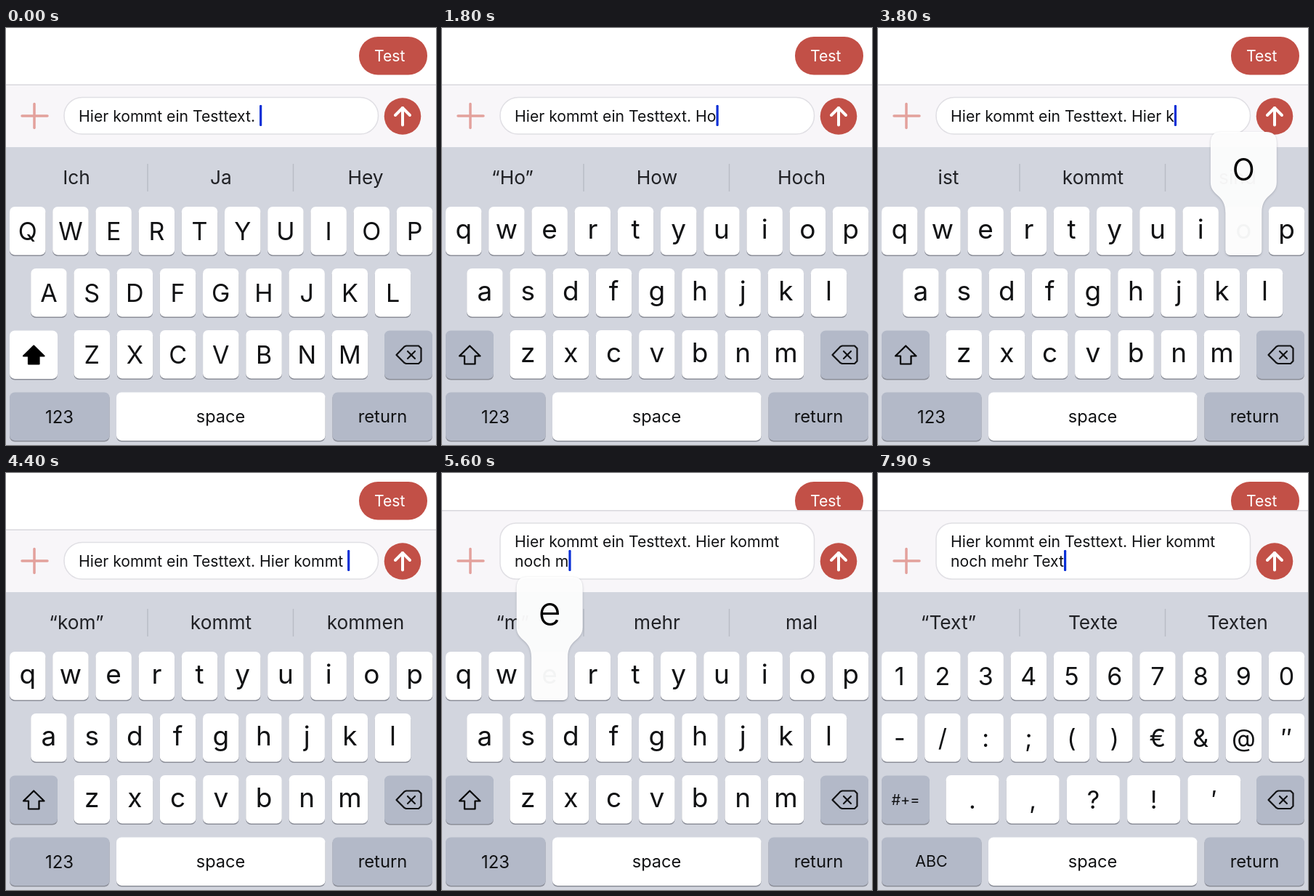
An HTML page with a canvas for the animation above (8000 ms loop, 592 by 574 pixels).

```html
<!DOCTYPE html>
<html lang="de">
<head>
<meta charset="utf-8">
<style>
html, body { margin: 0; width: 100%; height: 100%; overflow: hidden; background: #fff; }
canvas { display: block; }
</style>
</head>
<body>
<canvas id="stage" width="592" height="574"></canvas>
<script>
const c = document.getElementById('stage').getContext('2d');
const LOOP = 8000, HOLD = 110, LAG = 160;
const RED = '#c25047', GREY = '#b3b9c8', INK = '#111214';
const FIRST = 'Hier kommt ein Testtext. ', WRAP = 36;
const WRAP_TIME = 4810, PITCH = 59.2;

// [touch time, key]
const taps = [
  [1000, 'H'], [1400, 'o'], [2100, '<'], [2500, 'i'], [2950, 'e'], [3150, 'r'],
  [3400, ' '], [3600, 'k'], [3800, 'o'], [4000, 'm'], [4280, 'mt '], [4550, 'n'],
  [4700, 'o'], [4850, 'c'], [5000, 'h'], [5150, ' '], [5300, 'm'], [5560, 'e'],
  [5800, 'h'], [6000, 'r'], [6150, ' '], [6640, 'T'], [6900, 'e'], [7150, 'x'], [7400, 't']
];

const next = { '': 'Ich Ja Hey', 'Hier': 'ist kommt sind', 'kommt': 'der noch ein',
  'noch': 'ein mal nicht', 'mehr': 'als Geld Zeit' };
const complete = { H: 'Hallo Hast', Ho: 'How Hoch', Hi: 'Hier 👋', Hie: 'Hier Hielt',
  Hier: 'Hiermit Hierher', k: 'kann kein', ko: 'kommt kommen', kom: 'kommt kommen',
  n: 'noch nicht', no: 'noch nochmal', noc: 'noch nochmal', noch: 'nochmal nochmals',
  m: 'mehr mal', me: 'mehr mein', meh: 'mehr mehrere', mehr: 'mehrere mehrmals',
  T: 'Tag Tage', Te: 'Teil Test', Tex: 'Text Texte', Text: 'Texte Texten' };

const letters = ['QWERTYUIOP', 'ASDFGHJKL', 'ZXCVBNM'];
const symbols = ['1234567890', '-/:;()€&@″', '.,?!′'];

function typed(t) {
  let s = '';
  for (const [at, key] of taps) {
    if (at + HOLD > t) break;
    s = key === '<' ? s.slice(0, -1) : s + key;
  }
  return s;
}

function suggestions(t, caps) {
  const s = typed(t - LAG), words = s.split(' '), word = words.pop();
  if (word) return ['“' + word + '”', ...complete[word].split(' ')];
  const list = next[words.pop() || ''].split(' ');
  return caps ? list.map(w => w[0].toUpperCase() + w.slice(1)) : list;
}

function label(s, x, y, size, color = INK, align = 'center', weight = 400) {
  c.font = `${weight} ${size}px Inter, "Open Sans", sans-serif`;
  c.textAlign = align;
  c.fillStyle = color;
  c.fillText(s, x, y);
}

function box(x, y, w, h, r, fill) {
  c.beginPath();
  c.roundRect(x, y, w, h, r);
  c.fillStyle = fill;
  c.fill();
}

function key(x, y, w, fill = '#fff') {
  box(x, y + 1.6, w, 66.4, 7, '#8b8e98');
  box(x, y, w, 66.4, 7, fill);
}

function line(points, color, width, close) {
  c.beginPath();
  points.forEach(p => c.lineTo(...p));
  if (close) c.closePath();
  c.strokeStyle = color;
  c.lineWidth = width;
  c.stroke();
}

function hand() {
  const arm = (points, w) => {
    line(points, '#d9992b', w + 1.2);
    line(points, '#ffcb45', w);
  };
  arm([[501, 213], [510, 198]], 5.5);
  [[482, 205], [482, 198], [487, 193], [494, 193]].forEach((p, i) =>
    arm([p, [496 + i * 2.5, 216 - i * 2.5]], 5.5));
  c.beginPath();
  c.ellipse(502, 212, 11, 10, .7, 0, 7);
  c.fillStyle = '#ffcb45';
  c.fill();
  c.strokeStyle = '#777a82';
  c.lineWidth = 1.5;
  for (const [x, y, a] of [[498, 196, -1.25], [489, 211, 2.1]])
    for (const r of [9, 12.5]) {
      c.beginPath();
      c.arc(x, y, r, a, a + .9);
      c.stroke();
    }
}

function popup(x, y, ch, caps) {
  c.save();
  c.globalAlpha = .95;
  c.shadowColor = 'rgba(60,65,80,.3)';
  c.shadowBlur = 3;
  c.shadowOffsetY = 1;
  c.translate(x, y);
  c.beginPath();
  c.moveTo(-31, -103);
  c.lineTo(31, -103);
  c.quadraticCurveTo(45.5, -103, 45.5, -88);
  c.lineTo(45.5, -34);
  c.bezierCurveTo(45.5, -14, 25, -18, 25, 8);
  c.lineTo(25, 60);
  c.quadraticCurveTo(25, 67, 18, 67);
  c.lineTo(-18, 67);
  c.quadraticCurveTo(-25, 67, -25, 60);
  c.lineTo(-25, 8);
  c.bezierCurveTo(-25, -18, -45.5, -14, -45.5, -34);
  c.lineTo(-45.5, -88);
  c.quadraticCurveTo(-45.5, -103, -31, -103);
  c.fillStyle = '#fff';
  c.fill();
  c.restore();
  label(ch, x, y - 37, caps ? 58 : 54, '#000', 'center', 300);
}

function inputBar(t) {
  const p = Math.min(1, Math.max(0, (t - WRAP_TIME) / 150));
  const rise = 26.5 * p * (2 - p);
  const all = FIRST + typed(t);
  const wrapped = t >= WRAP_TIME;

  box(486, 12, 94, 52.5, 26, RED);
  label('Test', 507, 45.5, 21.2, '#fff', 'left');
  box(0, 78 - rise, 592, 87 + rise, 0, '#f8f6f9');
  box(0, 77.5 - rise, 592, 1.5, 0, '#d9d8dd');
  box(80, 95.5 - rise, 432.5, 50.5 + rise, 25 - rise * .12, '#fff');
  c.strokeStyle = '#e0dfe4';
  c.lineWidth = 1.5;
  c.stroke();

  line([[22, 121], [57, 121]], '#e3a19c', 3.5);
  line([[39, 104.5], [39, 137.5]], '#e3a19c', 3.5);
  c.beginPath();
  c.arc(546, 121.5, 25.3, 0, 7);
  c.fillStyle = RED;
  c.fill();
  line([[546, 133.5], [546, 110]], '#fff', 4);
  line([[536, 120], [546, 110], [556, 120]], '#fff', 4);

  const rows = wrapped ? [all.slice(0, WRAP), all.slice(WRAP)] : [all];
  label(rows[0], 100, 128.5 - rise, 21.2, INK, 'left');
  if (wrapped) label(rows[1], 100, 128.5, 21.2, INK, 'left');
  if (t < 400 || t > 800) {
    const x = 100 + c.measureText(rows[rows.length - 1]).width;
    box(x, 106, 3.2, 29, 1.2, '#0a2fd6');
  }
}

function draw(t) {
  const numeric = t >= 7700;
  const caps = t < 1000 + HOLD || (t >= 6400 && t < 6640 + HOLD);
  const active = taps.find(([at]) => t >= at && t < at + HOLD);
  const pressed = active ? active[1] : '';
  c.lineCap = c.lineJoin = 'round';
  box(0, 0, 592, 574, 0, '#fff');
  inputBar(t);
  box(0, 164, 592, 410, 0, '#d2d5de');

  for (const x of [195, 395.5]) box(x - .75, 187, 1.5, 38, 0, '#b9bcc6');
  suggestions(t, caps).forEach((s, i) => {
    if (s === '👋') hand();
    else label(s, 97 + i * 199, 215, 26.3, '#202125');
  });

  let bubble;
  (numeric ? symbols : letters).forEach((row, r) => {
    const y = 246 + r * 85;
    const wide = numeric && r === 2;
    const x0 = r === 0 || (numeric && r === 1) ? 5 : r === 1 ? 34.2 : 93.5;
    const w = wide ? 73 : 49.5, step = wide ? 83.2 : PITCH;
    [...row].forEach((name, i) => {
      const ch = numeric || caps ? name : name.toLowerCase();
      const x = x0 + i * step, mid = x + w / 2;
      key(x, y, w);
      if (numeric) label(ch, mid, y + 46, 34);
      else label(ch, mid, y + (caps ? 46 : 44), caps ? 34 : 37);
      if (ch === pressed) bubble = [mid, y, ch, caps];
    });
  });

  key(5, 416.5, 66, caps ? '#fff' : GREY);
  if (numeric) label('#+=', 38, 457, 20);
  else {
    line([[38.2, 437.5], [52.5, 451.5], [45.5, 451.5], [45.5, 462.5], [31, 462.5],
      [31, 451.5], [24, 451.5]], '#000', 2.2, true);
    if (caps) {
      c.fillStyle = '#000';
      c.fill();
    }
  }

  key(521, 416.5, 66, pressed === '<' ? '#fff' : GREY);
  line([[537.5, 450], [548.5, 438.5], [551, 437.5], [568, 437.5], [571.5, 441],
    [571.5, 458.5], [568, 462], [551, 462], [548.5, 461]], INK, 2.2, true);
  line([[553, 445], [563, 455]], INK, 2.2);
  line([[563, 445], [553, 455]], INK, 2.2);

  key(5, 501.5, 137.5, GREY);
  key(152, 501.5, 287.5, pressed === ' ' ? GREY : '#fff');
  key(449.5, 501.5, 137.5, GREY);
  if (numeric) label('ABC', 73.5, 541.5, 21.5);
  else label('123', 73.5, 544, 24);
  label('space', 295.5, 542.5, 23.6);
  label('return', 518.5, 542.5, 23.8);
  if (bubble) popup(...bubble);
}

const start = performance.now();
function tick() {
  draw((performance.now() - start) % LOOP);
  requestAnimationFrame(tick);
}
tick();
</script>
</body>
</html>
```
